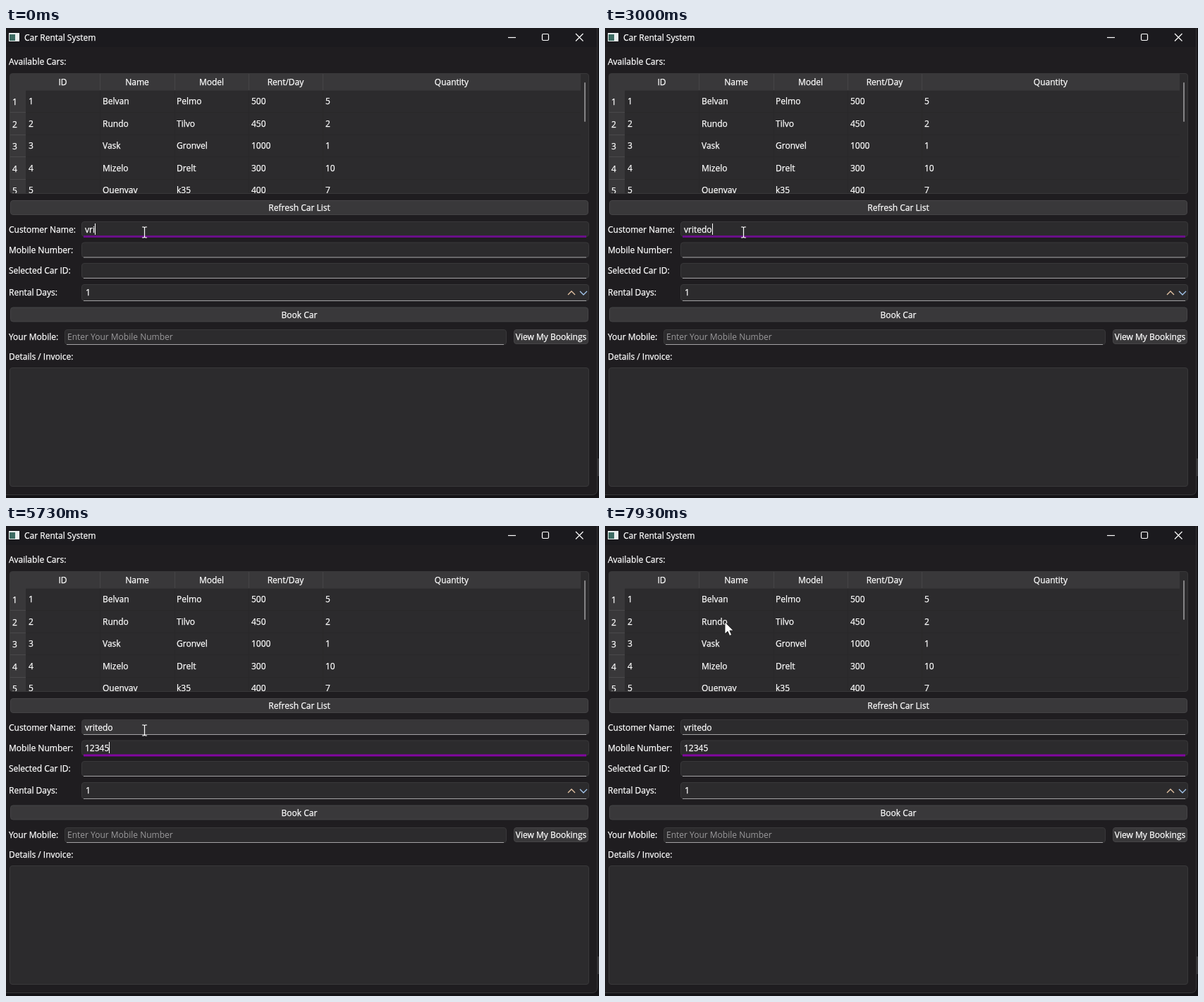
These frames come from a looping animation (841x666 px, 8 s). An HTML page:

```html
<!DOCTYPE html>
<html lang="en">
<head>
<meta charset="utf-8">
<title>Car Rental System</title>
<style>
  html, body { margin: 0; width: 100%; height: 100%; overflow: hidden; background: #141316; }
  svg { display: block; width: 841px; height: 666px; }
  text { font: 12px "Open Sans", "Noto Sans", sans-serif; fill: #fff; stroke: #fff; stroke-width: .25; white-space: pre; }
  .mid { text-anchor: middle; }
  .hint { fill: #9b9a9c; stroke: none; }
  .box { fill: #2c2b2d; stroke: #39383a; }
  .button { fill: #39383a; stroke: #454446; }
  .button.hover { fill: #8b8a8b; stroke: #959495; }
  .icon { fill: none; stroke: #fff; stroke-width: 1.2; }
</style>
</head>
<body>
<svg id="stage" viewBox="0 0 841 666"></svg>
<script>
const stage = document.getElementById('stage');
const $ = id => document.getElementById(id);

const text = (x, y, string, attrs = '') => `<text x="${x}" y="${y}" ${attrs}>${string}</text>`;
const rect = (x, y, w, h, attrs) => `<rect x="${x}" y="${y}" width="${w}" height="${h}" ${attrs}/>`;
const path = (d, attrs) => `<path d="${d}" ${attrs}/>`;
const panel = (x, y, w, h, attrs) => rect(x + .5, y + .5, w - 1, h - 1, `rx="3.5" ${attrs}`);
const button = (x, y, w, label, id = '') =>
  panel(x, y, w, 21, `class="button" id="${id}"`) + text(x + w / 2, y + 15, label, 'class="mid"');
const field = (x, y, w, h, id = '') =>
  panel(x, y, w, h, `class="box" id="${id}Box"`) +
  rect(x + 3, y + h - 1, w - 7, 1, `fill="#a3a2a4" id="${id}Line"`);

function table() {
  const columns = [[32, 80.5, 'ID'], [137, 186, 'Name'], [242, 291.5, 'Model'],
                   [348, 396.5, 'Rent/Day'], [453, 632, 'Quantity']];
  const cars = [['Belvan', 'Pelmo', 500, 5], ['Rundo', 'Tilvo', 450, 2], ['Vask', 'Gronvel', 1000, 1],
                ['Mizelo', 'Drelt', 300, 10], ['Quenvay', 'k35', 400, 7]];
  const edges = [133, 239, 344, 449];
  let out = panel(5, 64, 822, 171, 'class="box"') + '<g clip-path="url(#tableClip)">' +
    rect(6, 65, 809, 23, 'fill="#39383a"') + rect(6, 65, 22, 169, 'fill="#39383a"');
  for (const x of edges) out += rect(x, 65, 1, 23, 'fill="#464547"') + rect(x, 88, 1, 146, 'fill="#292829"');
  out += rect(28, 88, 787, 1, 'fill="#343335"');
  for (const [, center, name] of columns) out += text(center, 81, name, 'class="mid"');
  cars.forEach((car, i) => {
    const y = Math.round(108 + i * 31.6);
    out += text(9, y + 1, i + 1);
    [i + 1, ...car].forEach((value, c) => out += text(columns[c][0], y, value));
    if (i < 4) out += rect(6, y + 11, 22, 1, 'fill="#4a494b"') + rect(28, y + 11, 787, 1, 'fill="#292829"');
  });
  return out + '</g>' + rect(820, 77, 2, 56, 'rx="1" fill="#848385"');
}

stage.innerHTML =
  '<clipPath id="tableClip"><rect x="5" y="64" width="822" height="170" rx="4"/></clipPath>' +
  path('M-2-2H838.5V654Q838.5 661.5 831 661.5H-2Z', 'fill="#1f1d20" stroke="#373638"') +
  rect(0, 0, 838, 27, 'fill="#1b1a1e"') +
  rect(839, 610, 2, 25, 'fill="#343336"') +
  rect(4, 7, 15, 12, 'fill="#e9eeee"') + rect(5, 9, 8, 9, 'fill="#3c6b62"') +
  text(26, 18, 'Car Rental System') +
  path('M712 13.5h11', 'class="icon"') +
  rect(760.5, 8.5, 9, 9, 'rx="1.5" class="icon"') +
  path('M808 8l10.5 10.5M818.5 8L808 18.5', 'class="icon"') +
  text(4, 52, 'Available Cars:') + table() +
  button(6, 244, 820, 'Refresh Car List', 'refresh') +
  text(4, 290, 'Customer Name:') + field(107, 274, 720, 22, 'name') +
  text(4, 319, 'Mobile Number:') + field(107, 303.5, 720, 22, 'mobile') +
  text(4, 348, 'Selected Car ID:') + field(107, 333, 720, 22) +
  text(4, 379, 'Rental Days:') + field(107, 363, 720, 24) + text(113, 379, '1') +
  path('M797 378l5-5 5 5', 'fill="none" stroke="#e6c5a5" stroke-width="1.3"') +
  path('M814 373l5 5 5-5', 'fill="none" stroke="#a5c8ee" stroke-width="1.3"') +
  button(6, 395.5, 820, 'Book Car') +
  text(4, 442, 'Your Mobile:') + field(83, 427, 627, 22) +
  text(87, 442, 'Enter Your Mobile Number', 'class="hint"') +
  button(720, 427, 106, 'View My Bookings') +
  text(4, 470, 'Details / Invoice:') + panel(5, 481, 822, 169, 'class="box"') +
  text(112, 290, '', 'id="nameText"') + text(112, 319, '', 'id="mobileText"') +
  rect(0, 0, 1, 16, 'fill="#fff" id="caret"') +
  '<g id="pointer">' +
  path('M-3.5-7.5h2.5l1 1 1-1h2.5M0-6.5V6.5M-3.5 7.5h2.5l1-1 1 1h2.5', 'class="icon" id="beam"') +
  path('M0 0V17l4-3.7 2.7 6.2 2.9-1.3-2.7-6H12Z', 'fill="#fff" stroke="#111" stroke-width=".8" id="arrow"') +
  '</g>';

const LOOP = 8000, BLINK = 670, FOCUS_MOBILE = 3200;
const NAME = 'vritedo', MOBILE = '12345';
const nameKeys = [0, 0, 0, 200, 400, 600, 800];
const mobileKeys = [4080, 4280, 4480, 4680, 4880];
const route = [[6150, 196.5, 289.5], [6480, 222, 252], [6850, 222, 252], [7750, 170, 136]];

const typed = (string, keys, t) => string.slice(0, keys.filter(k => k <= t).length);

function pointerAt(t) {
  if (t <= route[0][0]) return route[0].slice(1);
  const next = route.findIndex(stop => stop[0] > t);
  if (next < 0) return route.at(-1).slice(1);
  const [t0, x0, y0] = route[next - 1], [t1, x1, y1] = route[next];
  const u = (t - t0) / (t1 - t0), ease = u * u * (3 - 2 * u);
  return [x0 + (x1 - x0) * ease, y0 + (y1 - y0) * ease];
}

function setLine(id, bottom, focused, color) {
  const line = $(id + 'Line');
  line.setAttribute('y', focused ? bottom - 2 : bottom - 1);
  line.setAttribute('height', focused ? 3 : 1);
  line.setAttribute('fill', focused ? color : '#a3a2a4');
}

function draw(t) {
  const onMobile = t >= FOCUS_MOBILE;
  $('nameText').textContent = typed(NAME, nameKeys, t);
  $('mobileText').textContent = typed(MOBILE, mobileKeys, t);
  setLine('name', 296, !onMobile, '#690f88');
  setLine('mobile', 325.5, onMobile, '#8206a0');

  const [x, y] = pointerAt(t);
  const overName = y > 274;
  $('pointer').setAttribute('transform', `translate(${x} ${y})`);
  $('beam').style.display = overName ? '' : 'none';
  $('arrow').style.display = overName ? 'none' : '';
  $('nameBox').style.fill = overName && onMobile ? '#373638' : '';
  $('refresh').classList.toggle('hover', y >= 244 && y < 265);

  // Every key press or focus change restarts the caret blink.
  const lastInput = Math.max(...[...nameKeys, FOCUS_MOBILE, ...mobileKeys].filter(k => k <= t));
  const active = $(onMobile ? 'mobileText' : 'nameText');
  const width = active.textContent ? active.getComputedTextLength() : 0;
  const caret = $('caret');
  caret.setAttribute('x', Math.round(112 + width));
  caret.setAttribute('y', onMobile ? 306 : 277);
  caret.style.display = (t - lastInput) % BLINK < BLINK / 2 ? '' : 'none';
}

const start = performance.now();
function tick() {
  draw((performance.now() - start) % LOOP);
  requestAnimationFrame(tick);
}
tick();
</script>
</body>
</html>
```
